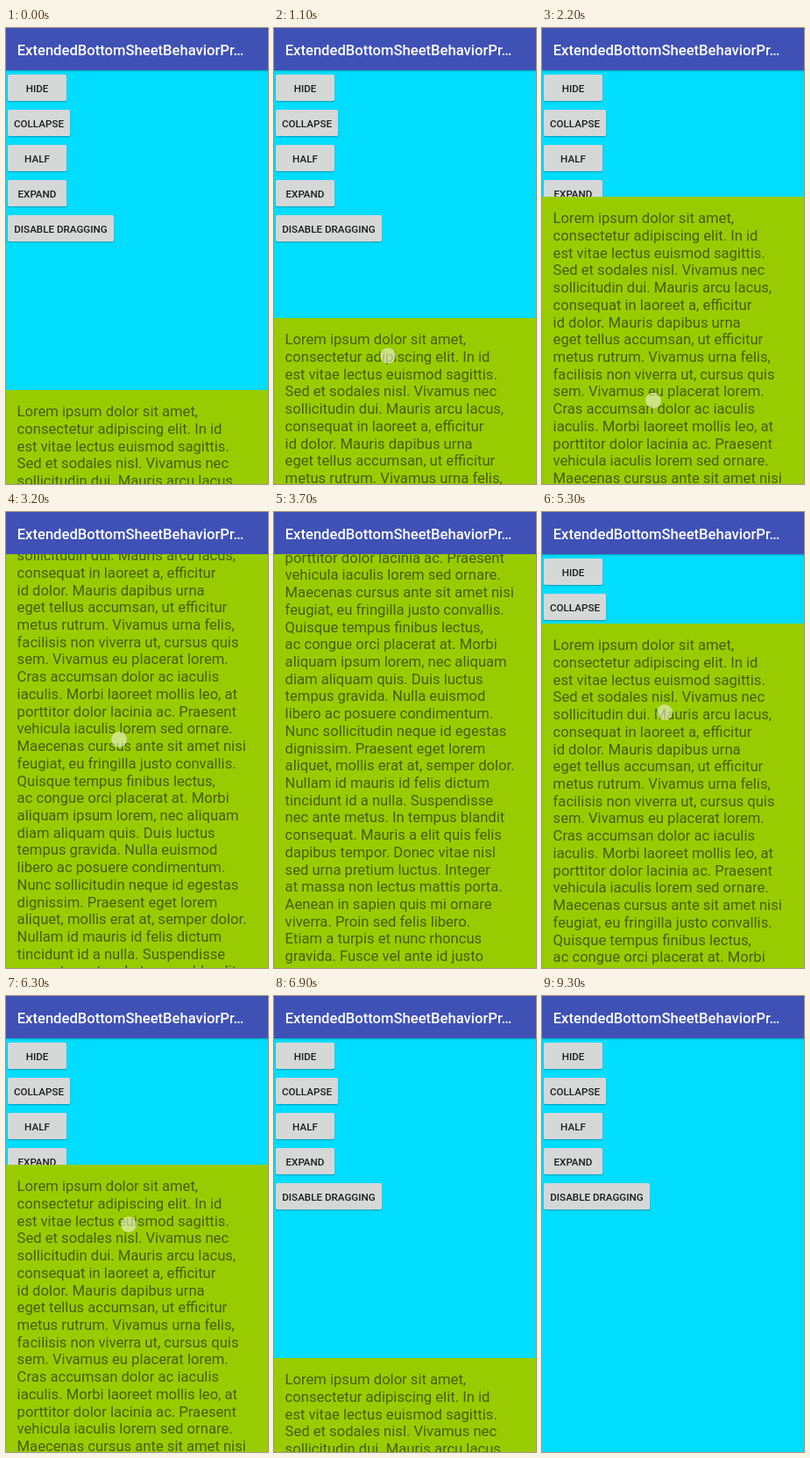
An HTML page for the animation above (9400 ms loop, 299 px wide and 519 px high).

```html
<!DOCTYPE html>
<html lang="en">
<head>
<meta charset="utf-8">
<title>Bottom sheet</title>
<style>
  html, body { margin: 0; width: 100%; height: 100%; overflow: hidden; }
  body { font-family: Roboto, "Noto Sans", sans-serif; background: #00ddff; }
  #stage { position: relative; width: 299px; height: 519px; overflow: hidden; background: #00ddff; }
  header {
    position: absolute; inset: 0 0 auto; height: 48px; box-sizing: border-box;
    padding-left: 12.7px; background: #3f51b5; color: #fff;
    font-size: 16.61px; font-weight: 500; line-height: 52px; white-space: nowrap;
    box-shadow: 0 1px 2px rgba(0, 0, 0, .3);
  }
  .button {
    position: absolute; left: 2px; width: 67px; height: 30px;
    border-radius: 1.7px; background: #d6d7d7; color: rgba(0, 0, 0, .87);
    box-shadow: 0 1px 1.5px rgba(0, 0, 0, .3);
    font-size: 11.63px; font-weight: 500; line-height: 32px;
    text-align: center; white-space: nowrap;
  }
  #content { position: absolute; inset: 48px 0 0; overflow: hidden; }
  #sheet {
    position: absolute; top: -48px; left: 0; width: 299px; height: 900px;
    box-sizing: border-box; padding: 15.3px 0 0 12.6px;
    background: #99cc00; color: rgba(0, 0, 0, .54);
    font-size: 16.61px; line-height: 19.72px; white-space: pre;
  }
  #finger {
    position: absolute; top: -9px; left: -9px; width: 18px; height: 18px;
    border-radius: 50%; background: rgba(240, 243, 225, .58);
  }
</style>
</head>
<body>
<div id="stage">
  <div class="button" style="top:53px">HIDE</div>
  <div class="button" style="top:93px;width:71px">COLLAPSE</div>
  <div class="button" style="top:133px">HALF</div>
  <div class="button" style="top:173px">EXPAND</div>
  <div class="button" style="top:213px;width:121px">DISABLE DRAGGING</div>
  <header>ExtendedBottomSheetBehaviorPr…</header>
  <div id="content"><div id="sheet">Lorem ipsum dolor sit amet,
consectetur adipiscing elit. In id
est vitae lectus euismod sagittis.
Sed et sodales nisl. Vivamus nec
sollicitudin dui. Mauris arcu lacus,
consequat in laoreet a, efficitur
id dolor. Mauris dapibus urna
eget tellus accumsan, ut efficitur
metus rutrum. Vivamus urna felis,
facilisis non viverra ut, cursus quis
sem. Vivamus eu placerat lorem.
Cras accumsan dolor ac iaculis
iaculis. Morbi laoreet mollis leo, at
porttitor dolor lacinia ac. Praesent
vehicula iaculis lorem sed ornare.
Maecenas cursus ante sit amet nisi
feugiat, eu fringilla justo convallis.
Quisque tempus finibus lectus,
ac congue orci placerat at. Morbi
aliquam ipsum lorem, nec aliquam
diam aliquam quis. Duis luctus
tempus gravida. Nulla euismod
libero ac posuere condimentum.
Nunc sollicitudin neque id egestas
dignissim. Praesent eget lorem
aliquet, mollis erat at, semper dolor.
Nullam id mauris id felis dictum
tincidunt id a nulla. Suspendisse
nec ante metus. In tempus blandit
consequat. Mauris a elit quis felis
dapibus tempor. Donec vitae nisl
sed urna pretium luctus. Integer
at massa non lectus mattis porta.
Aenean in sapien quis mi ornare
viverra. Proin sed felis libero.
Etiam a turpis et nunc rhoncus
gravida. Fusce vel ante id justo
pulvinar egestas. Ut non tellus
eu metus commodo lacinia.
Curabitur nec velit in arcu mollis
faucibus. Nam vitae purus ac est.</div></div>
  <div id="finger"></div>
</div>
<script>
  const LOOP = 9400, TICK = 100, COLLAPSED = 412;
  const sheet = document.getElementById('sheet');
  const finger = document.getElementById('finger');

  // Sheet top per tick; values above the toolbar's edge are scrolled content.
  // The finger starts at (x, y) and follows the sheet for `held` ticks.
  const gestures = [
    { at: 900,  x: 130, y: 455, held: 4, tops: [412, 385, 330, 260, 205, 192] },
    { at: 2200, x: 127, y: 424, held: 4, tops: [192, 180, 140, 95, 60, 48] },
    { at: 3000, x: 129, y: 361, held: 4, tops: [48, 3, -54, -112, -157, -192, -214, -229, -238, -242] },
    { at: 4000, x: 152, y: 89,  held: 6, tops: [-242, -237, -214, -177, -137, -88, -37, 8, 36, 48] },
    { at: 5000, x: 140, y: 149, held: 5, tops: [48, 62, 94, 127, 155, 178, 189, 192] },
    { at: 6300, x: 140, y: 260, held: 4, tops: [192, 205, 250, 310, 365, 400, 412] },
    { at: 8300, x: 135, y: 440, held: 4, tops: [412, 420, 445, 475, 500, 515, 519] }
  ];

  const move = (el, x, y) => { el.style.transform = `translate(${x}px, ${y}px)`; };

  function render(time) {
    const gesture = gestures.findLast(g => g.at <= time);
    let top = COLLAPSED, touching = false;
    if (gesture) {
      const { at, x, y, held, tops } = gesture;
      const step = Math.floor((time - at) / TICK);
      top = tops[Math.min(step, tops.length - 1)];
      touching = step < held;
      move(finger, x, y + top - tops[0]);
    }
    finger.style.visibility = touching ? 'visible' : 'hidden';
    move(sheet, 0, top);
  }

  const start = performance.now();
  function frame() {
    render((performance.now() - start) % LOOP);
    requestAnimationFrame(frame);
  }
  frame();
</script>
</body>
</html>
```
